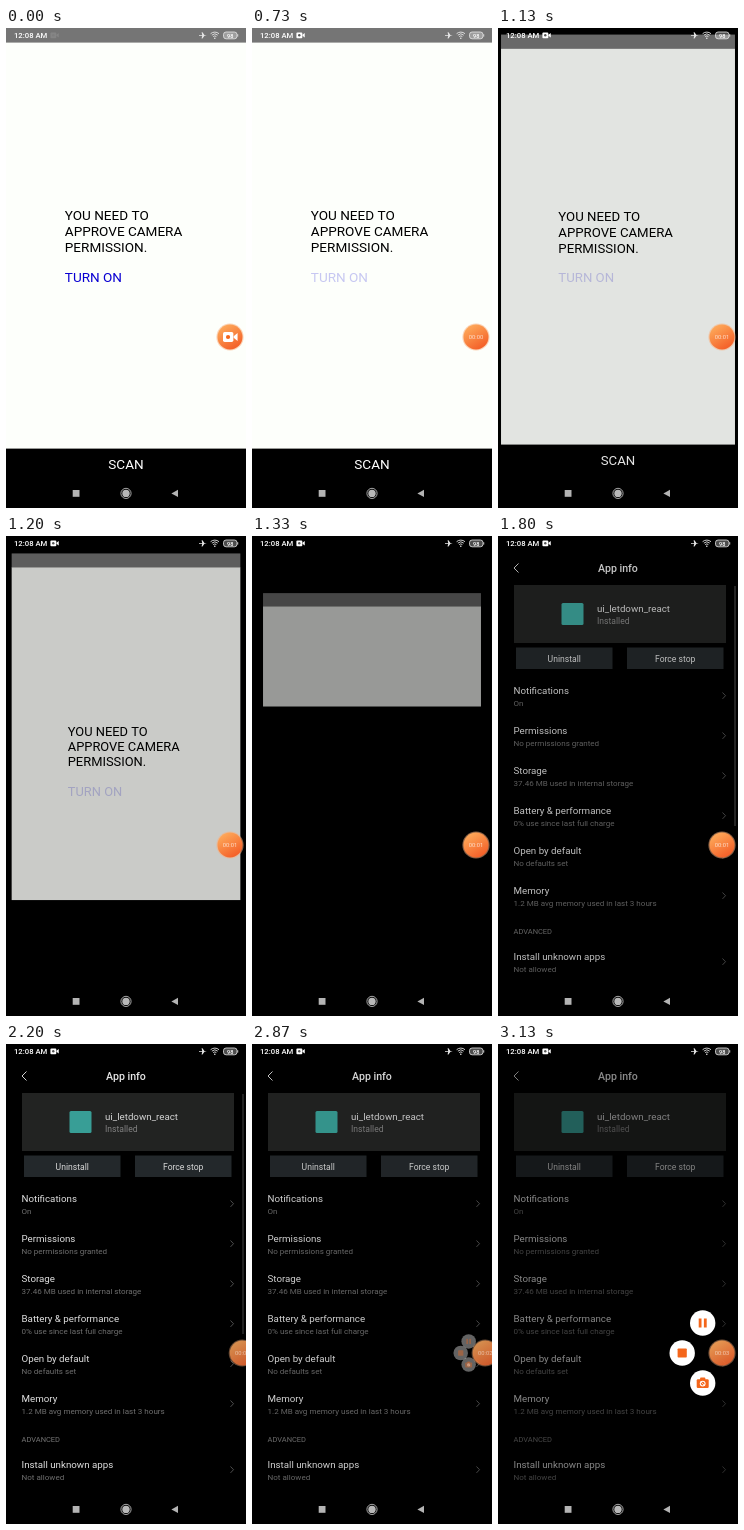
Recreate the animation shown at these times as an HTML page with a canvas. Size 240 by 480 pixels, loop 3390 ms.

```html
<!DOCTYPE html>
<html lang="en">
<head>
<meta charset="utf-8">
<title>Camera permission</title>
<style>
html, body { margin: 0; width: 100%; height: 100%; overflow: hidden; background: #000; }
canvas { display: block; width: 240px; height: 480px; }
</style>
</head>
<body>
<canvas id="stage"></canvas>
<script>
const W = 240, H = 480, LOOP = 3390, FPS = 15;
const canvas = document.getElementById('stage');
const ctx = canvas.getContext('2d');
const dpr = window.devicePixelRatio || 1;
canvas.width = W * dpr;
canvas.height = H * dpr;

const clamp = v => Math.max(0, Math.min(1, v));
const ramp = (t, a, b) => clamp((t - a) / (b - a));
const lerp = (a, b, p) => a + (b - a) * p;
const easeOut = p => 1 - (1 - p) ** 3;

function text(str, x, y, size, color, align = 'left', weight = 400) {
  ctx.font = `${weight} ${size}px Roboto, sans-serif`;
  ctx.textAlign = align;
  ctx.fillStyle = color;
  ctx.fillText(str, x, y);
}

function rect(x, y, w, h, color) {
  ctx.fillStyle = color;
  ctx.fillRect(x, y, w, h);
}

function rounded(x, y, w, h, r, color) {
  ctx.fillStyle = color;
  ctx.beginPath();
  ctx.roundRect(x, y, w, h, r);
  ctx.fill();
}

function disc(x, y, r, color) {
  ctx.fillStyle = color;
  ctx.beginPath();
  ctx.arc(x, y, r, 0, 7);
  ctx.fill();
}

function poly(points, color) {
  ctx.fillStyle = color;
  ctx.beginPath();
  points.forEach(([x, y]) => ctx.lineTo(x, y));
  ctx.closePath();
  ctx.fill();
}

function line(points, color, width) {
  ctx.strokeStyle = color;
  ctx.lineWidth = width;
  ctx.beginPath();
  points.forEach(([x, y]) => ctx.lineTo(x, y));
  ctx.stroke();
}

// Draw a group with its own opacity and transform
function group(alpha, x, y, scale, draw) {
  ctx.save();
  ctx.globalAlpha *= alpha;
  ctx.translate(x, y);
  ctx.scale(scale, scale);
  draw();
  ctx.restore();
}

function promptScreen(t) {
  rect(0, 0, W, H, '#000');
  rect(0, 0, W, 15, '#757575');
  rect(0, 14.6, W, 406, '#fdfffb');
  ['YOU NEED TO', 'APPROVE CAMERA', 'PERMISSION.'].forEach((s, i) =>
    text(s, 58.8, 191.6 + i * 16, 13.55, '#000'));
  ctx.globalAlpha = t < 725 ? 1 : lerp(0.22, 0.2, ramp(t, 730, 930));
  text('TURN ON', 58.8, 254.2, 13.55, '#0a00d2');
  ctx.globalAlpha = 1;
  text('SCAN', 120, 441.2, 13.55, '#fff', 'center');
}

const rows = [
  ['Notifications', 'On', 155],
  ['Permissions', 'No permissions granted', 195],
  ['Storage', '37.46 MB used in internal storage', 235],
  ['Battery & performance', '0% use since last full charge', 275],
  ['Open by default', 'No defaults set', 315],
  ['Memory', '1.2 MB avg memory used in last 3 hours', 355],
  ['Install unknown apps', 'Not allowed', 421]
];

function infoScreen(t) {
  line([[20.5, 27.5], [16, 32], [20.5, 36.5]], '#d0d0d0', 1);
  text('App info', 120, 35.8, 10.6, '#e6e6e6', 'center', 500);

  rect(16, 49, 212, 58, '#222322');
  rounded(63.5, 67, 22, 22, 1.5, '#389e96');
  text('ui_letdown_react', 99, 75.8, 9.75, '#d4d4d4');
  text('Installed', 99, 88, 8.6, '#828282');

  [['Uninstall', 18], ['Force stop', 129]].forEach(([s, x]) => {
    rect(x, 111.5, 96.5, 21.5, '#23282b');
    text(s, x + 48.2, 125.6, 8.6, '#d8d8d8', 'center');
  });

  rows.forEach(([title, sub, y]) => {
    text(title, 15.5, y + 3.3, 9.75, '#e0e0e0');
    text(sub, 15.5, y + 14.8, 8.05, '#6e6e6e');
    line([[224.5, y + 1.5], [227.5, y + 4.7], [224.5, y + 7.9]], '#626262', 0.8);
  });
  text('ADVANCED', 15.5, 397.8, 7.5, '#747474');

  group(1 - ramp(t, 2130, 2450), 0, 0, 1, () => rect(236, 50, 2, 240, '#2c2c2c'));
}

function camcorder(x, y, s, color, dot) {
  group(1, x, y, s, () => {
    rounded(-5, -3.6, 7.4, 7.2, 1.2, color);
    poly([[2.6, -0.6], [5.4, -2.9], [5.4, 2.9], [2.6, 0.6]], color);
    disc(-1.4, 0, 1.5, dot);
  });
}

function systemBars(t) {
  text('12:08 AM', 8, 10, 7.7, '#fff', 'left', 500);
  group(lerp(0.12, 1, ramp(t, 0, 330)), 0, 0, 1, () =>
    camcorder(48.4, 7.3, 0.8, '#fff', '#555'));

  // airplane
  poly([[193, 6.9], [196.2, 6.9], [195.6, 4.2], [196.5, 4.2], [198.4, 6.9], [200.8, 7.3],
    [198.4, 7.8], [196.5, 10.5], [195.6, 10.5], [196.2, 7.8], [193, 7.8]], '#e6e6e6');
  // wifi
  ctx.strokeStyle = '#e6e6e6';
  ctx.lineWidth = 0.9;
  [2.4, 4.4, 6.3].forEach(r => {
    ctx.beginPath();
    ctx.arc(208.8, 10.4, r, -2.3, -0.84);
    ctx.stroke();
  });
  disc(208.8, 10.2, 0.8, '#e6e6e6');
  // battery
  rounded(217.5, 4, 13.5, 6.8, 2.6, 'rgba(255,255,255,.3)');
  ctx.lineWidth = 0.8;
  ctx.stroke();
  rect(231.4, 6.2, 0.8, 2.4, '#e6e6e6');
  text('98', 224.2, 9.5, 5.6, '#fff', 'center', 500);

  // navigation
  rect(66.7, 462, 6.8, 6.8, '#b4b4b4');
  disc(120, 465.4, 3.7, '#b8b8b8');
  ctx.strokeStyle = '#b8b8b8';
  ctx.lineWidth = 0.9;
  ctx.beginPath();
  ctx.arc(120, 465.4, 5.1, 0, 7);
  ctx.stroke();
  poly([[165.4, 465.4], [172, 461.7], [172, 469.1]], '#b4b4b4');
}

const ORANGE = '#f4661b';
const menu = [
  [-19.5, -30, () => {
    rect(-4, -4.5, 2.8, 9, ORANGE);
    rect(1.2, -4.5, 2.8, 9, ORANGE);
  }],
  [-40, 0, () => rounded(-4.6, -4.6, 9.2, 9.2, 0.8, ORANGE)],
  [-19.5, 30, () => {
    rounded(-2.6, -5.4, 5.2, 3, 0.8, ORANGE);
    rounded(-6, -3.8, 12, 8.8, 1.2, ORANGE);
    disc(0, 0.6, 2.9, '#fff');
    disc(0, 0.6, 1.8, ORANGE);
    line([[-2, -1.4], [2, 2.6]], '#fff', 0.8);
  }]
];

function recorder(t) {
  const hide = easeOut(ramp(t, 2100, 2330));
  const open = easeOut(ramp(t, 2820, 3130));
  const x = 224 + 15 * hide * (1 - open), y = 309;

  if (open > 0) menu.forEach(([dx, dy, icon]) =>
    group(open, 224.2 + dx * open, y + dy * open, lerp(0.3, 1, open), () => {
      disc(0, 0, 12.7, '#fff');
      icon();
    }));

  const alpha = lerp(lerp(1, 0.68, hide), 0.82, open);
  group(alpha, x, y, 1, () => {
    const fill = ctx.createLinearGradient(-6, -10, 6, 10);
    fill.addColorStop(0, '#fda557');
    fill.addColorStop(1, '#f4622a');
    disc(0, 0, 13.6, 'rgba(250,175,125,.55)');
    disc(0, 0, 12.5, fill);
    const timer = ramp(t, 60, 330);
    group(1 - timer, 0, 0, 1, () => camcorder(0, 0, 1.4, '#fff', ORANGE));
    group(timer * 0.75, 0, 0, 1, () =>
      text('00:0' + Math.floor(t / 1040), 0, 2.1, 5.8, '#fff', 'center'));
  });
}

function draw(t) {
  ctx.setTransform(dpr, 0, 0, dpr, 0, 0);
  ctx.globalAlpha = 1;
  rect(0, 0, W, H, '#000');

  // The prompt recedes while the settings page slides over it
  if (t < 1540) {
    const scale = 1 - 0.000335 * Math.max(0, t - 1058);
    const drop = 35 * (Math.max(0, t - 1105) / 228) ** 2;
    group(1, 120 * (1 - scale), 240 * (1 - scale) + drop, scale, () => {
      promptScreen(t);
      rect(0, 0, W, H, `rgba(0,0,0,${clamp((t - 1063) * 0.00148)})`);
    });
  }
  if (t > 1140) {
    const top = 480 * (1 - ramp(t, 1133, 1548)) ** 1.57;
    group(1, 0, top, 1, () => {
      rect(0, 0, W, H, '#000');
      const shown = t < 1533 ? 0.62 * ramp(t, 1340, 1533)
        : lerp(0.62, 1, ramp(t, 1533, 1960));
      group(shown, 0, 0, 1, () => infoScreen(t));
    });
    rect(0, 0, W, 445, `rgba(0,0,0,${0.4 * ramp(t, 2810, 3130)})`);
  }
  systemBars(t);
  recorder(t);
}

const start = performance.now();
function tick() {
  const t = (performance.now() - start) % LOOP;
  draw(Math.floor((t + 4) * FPS / 1000) * 1000 / FPS);
  requestAnimationFrame(tick);
}
tick();
</script>
</body>
</html>
```
